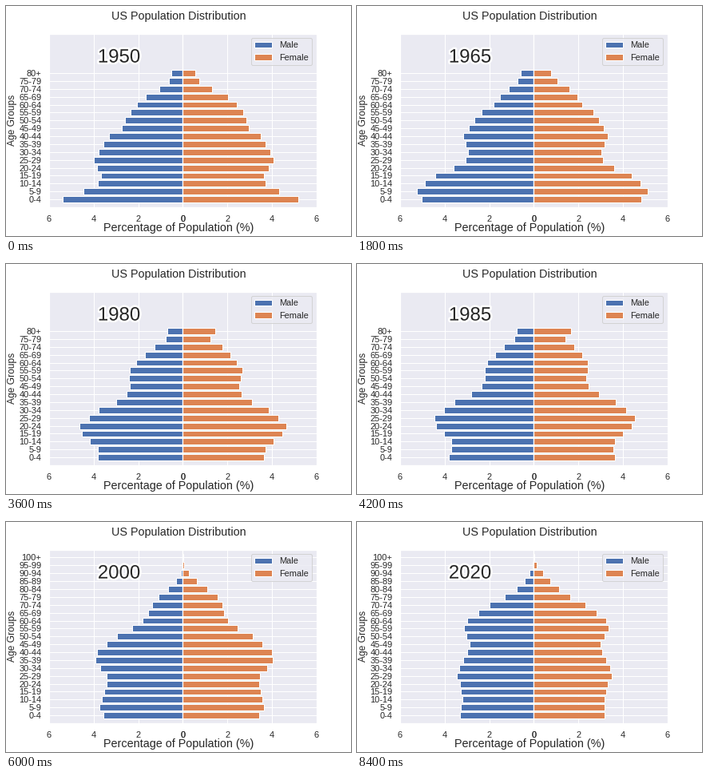
Animation, 432 px wide and 288 px high, one loop 9000 ms. Source, as a matplotlib script:

```python
import matplotlib.pyplot as plt
import matplotlib.patheffects as pe
import numpy as np
from matplotlib.animation import FuncAnimation

INK, PANEL = "#262626", "#EAEAF2"
BLUE, ORANGE = "#4C72B0", "#DD8452"

plt.rcParams.update({
    "font.family": "Liberation Sans", "font.size": 12,
    "figure.titlesize": 14.4, "figure.labelsize": 14.4,
    "axes.labelsize": 12, "legend.fontsize": 11,
    "xtick.labelsize": 11, "ytick.labelsize": 11,
    "text.color": INK, "axes.labelcolor": INK,
    "xtick.color": INK, "ytick.color": INK,
    "axes.facecolor": PANEL, "axes.edgecolor": "white",
    "axes.linewidth": 1.25, "axes.axisbelow": True,
    "axes.grid": True, "grid.color": "white", "grid.linewidth": 1,
    "patch.linewidth": 1,
})

YEARS = range(1950, 2021, 5)
GROUPS = 21

# Turning points of the size of each birth cohort, in million men.
COHORTS = [(1865, 3.6), (1880, 4.0), (1885, 4.6), (1905, 4.75), (1910, 5.55),
           (1925, 6.45), (1935, 5.85), (1940, 6.05), (1945, 7.1),
           (1950, 8.85), (1960, 11.15), (1965, 11.2), (1975, 9.85),
           (1980, 10.05), (1995, 11.7), (2000, 11.4), (2010, 11.6),
           (2020, 12.4)]

# Gompertz mortality: growth per age group, and level at age 75 by birth year.
MEN = 1.5, [(1875, 1.36), (1950, .45), (2020, .1)]
WOMEN = 1.6, [(1875, 1.2), (1900, .56), (1950, .25), (2020, .1)]
OPEN_GROUP = 1.15


def along(points, x):
    return np.interp(x, *zip(*points))


def shares(sex, year):
    """Percent of the whole population in each five-year age group."""
    growth, level = sex
    age = np.arange(GROUPS)
    born = year - 5 * age
    hazard = along(level, born) * growth ** (age - 15.0)
    arrivals = .12 * np.clip((born - 1945) / 20, 0, 1)
    people = along(COHORTS, born) * np.exp(-hazard)
    people *= 1 - arrivals * np.clip(1 - age / 6, 0, 1)
    if sex is WOMEN:
        people *= .96 + .01 * np.minimum(age, 6)
    n = 17 if year < 1990 else GROUPS
    people = np.append(people[:n - 1], OPEN_GROUP * people[n - 1:].sum())
    total = 158.8 + 2.46 * (year - 1950)
    return 100 * people / total


def age_labels(n):
    return [f"{5 * i}-{5 * i + 4}" for i in range(n - 1)] + [f"{5 * n - 5}+"]


fig, (left, right) = plt.subplots(
    1, 2, figsize=(6, 4), dpi=72, facecolor="white",
    gridspec_kw=dict(left=.125, right=.9, bottom=.125, top=.88, wspace=0))
fig.suptitle("US Population Distribution")
fig.supxlabel("Percentage of Population (%)")


def make_side(ax, color, xlim):
    bars = ax.barh(range(GROUPS), [0] * GROUPS, height=.8,
                   color=color, edgecolor="white")
    ax.set(xlim=xlim, ylim=(-1, GROUPS), xticks=range(0, 7, 2))
    ax.tick_params(length=0, pad=9.5)
    return bars


male = make_side(left, BLUE, (6, 0))
female = make_side(right, ORANGE, (0, 6))
left.set_ylabel("Age Groups", labelpad=2.5)
right.tick_params(labelleft=False)
right.legend([male, female], ["Male", "Female"], loc="upper right")
stamp = left.text(3.82, 17.35, "", size=24,
                  path_effects=[pe.withStroke(linewidth=5, foreground="white")])


def draw(k):
    year = YEARS[k]
    for ax, bars, sex in ((left, male, MEN), (right, female, WOMEN)):
        values = shares(sex, year)
        n = len(values)
        for i, bar in enumerate(bars):
            bar.set_visible(i < n)
            bar.set_width(values[i] if i < n else 0)
        ax.set_yticks(range(n), age_labels(n))
    stamp.set_text(str(year))
    return [*male, *female, stamp]


anim = FuncAnimation(fig, draw, frames=len(YEARS), interval=600,
                     repeat=True, repeat_delay=0, blit=False)
plt.show()
```
